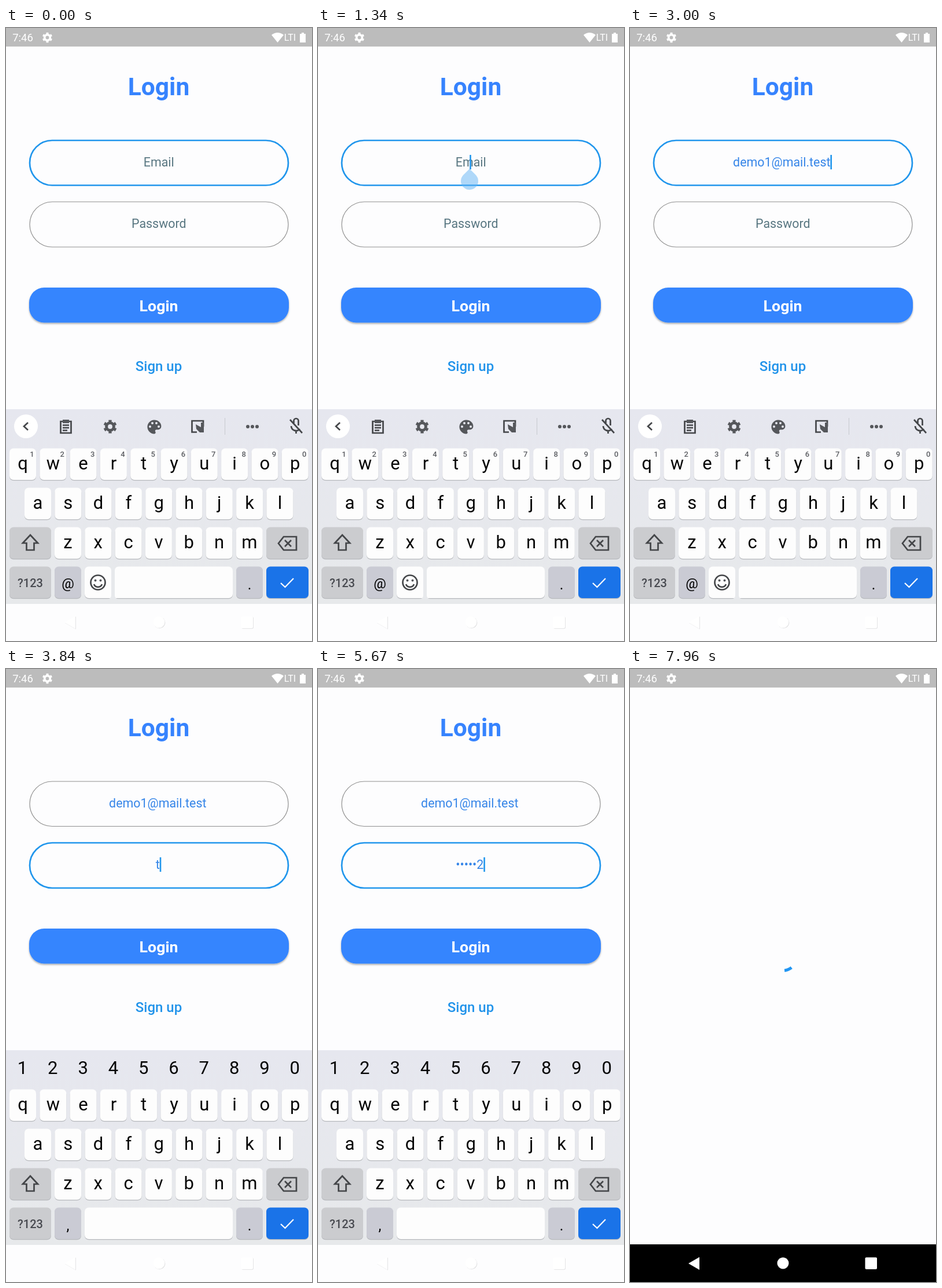
An HTML page for the animation above (8000 ms loop, 529 by 1058 pixels).

```html
<!DOCTYPE html>
<html lang="en">
<head>
<meta charset="utf-8">
<title>Login</title>
<style>
  html, body { margin: 0; width: 100%; height: 100%; overflow: hidden; background: #fdfdfe; }
  svg { display: block; width: 529px; height: 1058px; font-family: Roboto, sans-serif; }
  text { text-anchor: middle; }
  .line { fill: none; stroke: #444649; stroke-width: 2.7; }
  .field { fill: none; stroke: #8f8f8f; stroke-width: 1.2; }
  .field.on { stroke: #2196ec; stroke-width: 2.7; }
  .entry { font-size: 21.4px; fill: #3585e8; }
  .entry.hint { fill: #587681; }
  .letter { font-size: 31px; fill: #050505; }
  .small { font-size: 13px; font-weight: 500; fill: #5b5d62; }
</style>
</head>
<body>
<svg viewBox="0 0 529 1058">
  <defs>
    <g id="gear" fill="none" stroke="currentColor">
      <circle r="6.4" stroke-width="5"/>
      <circle r="9.6" stroke-width="4" pathLength="60" stroke-dasharray="5 5" stroke-dashoffset="-2.5"/>
    </g>
    <g id="nav">
      <path d="M101 1026L120 1015V1037Z"/>
      <circle cx="264.5" cy="1025.5" r="10"/>
      <rect x="406.500" y="1015.500" width="20.500" height="20.500" rx="2"/>
    </g>
    <filter id="shade" x="-5%" y="-20%" width="110%" height="150%">
      <feDropShadow dx="0" dy="2" stdDeviation="1.5" flood-opacity=".32"/>
    </filter>
    <linearGradient id="board" x2="0" y2="1">
      <stop stop-color="#e6e7ef"/><stop offset="1" stop-color="#e7e9eb"/>
    </linearGradient>
  </defs>

  <rect width="529" height="1058" fill="#fdfdfe"/>
  <g fill="#fff">
    <rect width="529" height="32" fill="#bcbcbc"/>
    <text x="29" y="23" font-size="18.5">7:46</text>
    <use href="#gear" color="#fff" transform="translate(71.500 16.500) scale(.75)"/>
    <path d="M459 12Q469.500 4 480 12L469.500 25Z"/>
    <text x="491" y="22" font-size="16">LTI</text>
    <path d="M511 8H515V10H518V25H508V10H511Z"/>
  </g>

  <g id="form">
    <text x="264" y="116" font-size="42.500" font-weight="700" fill="#3683fe">Login</text>
    <rect id="box0" class="field" x="41" y="194" width="447" height="77.500" rx="38.700"/>
    <rect id="box1" class="field" x="41" y="300" width="447" height="78" rx="39"/>
    <text id="entry0" class="entry" y="238.500"></text>
    <text id="entry1" class="entry" y="345"></text>
    <rect id="caret" width="2.600" height="25" fill="#2196ec"/>
    <path id="handle" d="M262 243L272.600 253.600A15 15 0 1 1 251.400 253.600Z" fill="#64b5f6"/>
    <rect x="40" y="448" width="449" height="60.500" rx="26" fill="#3585fe" filter="url(#shade)"/>
    <text x="264" y="489" font-size="26.700" font-weight="700" fill="#fff">Login</text>
    <text x="264" y="592" font-size="24" font-weight="500" fill="#2193ea">Sign up</text>
  </g>

  <circle id="spinner" r="23.500" pathLength="360" fill="none" stroke="#2196f3" stroke-width="5.200"/>

  <g id="keyboard">
    <rect y="658" width="529" height="336" fill="url(#board)"/>
    <rect y="994" width="529" height="64" fill="#fdfdfe"/>
    <g id="keys"></g>
    <g class="line">
      <path d="M42 875L55 889H48.500V901H35.500V889H29Z"/>
      <path d="M480 878H502V901H480L471 889.500ZM482 884L493 895M493 884L482 895"/>
      <path d="M475 958L482.500 965L497 950" stroke="#fff" stroke-width="2.300"/>
    </g>
    <text x="42" y="965" font-size="20" font-weight="500" fill="#484a50">?123</text>
    <text x="421" y="969" font-size="25">.</text>

    <g id="mailKeys">
      <circle cx="34.500" cy="687.500" r="20.500" fill="#fff"/>
      <g class="line">
        <path d="M38 681L31 687.500L38 694"/>
        <path d="M94.500 679H112.500V699H94.500ZM98 685.500H109M98 690H109M98 694.500H106"/>
        <path d="M341 688V678H321.500V697.500H330"/>
        <path d="M378.500 673V702" stroke="#c7c9ce" stroke-width="1"/>
        <path d="M497.500 682V678A4 4 0 0 1 505.500 678V686M493 687A8.500 8.500 0 0 0 508 692M501.500 695V700M491 676L512 699"/>
        <circle cx="159" cy="957" r="12.500"/>
        <path d="M152 960A7.500 7.500 0 0 0 166 960"/>
      </g>
      <g fill="#55575b">
        <path d="M98 676H109V682H98Z"/>
        <path d="M328 684L337 689V681H342V698H335L329 692Z"/>
        <use href="#gear" color="#55575b" transform="translate(180 688)"/>
        <path transform="translate(242 674) scale(1.200)" d="M12 2C6.500 2 2 6.500 2 12S6.500 22 12 22C13.500 22 14.500 20.500 13.500 19C12.700 17.500 13.500 16 15 16H17C20 16 22 14 22 11C22 6 17.500 2 12 2Z"/>
        <circle cx="418" cy="688" r="3"/><circle cx="426" cy="688" r="3"/><circle cx="434" cy="688" r="3"/>
        <circle cx="154.500" cy="953.500" r="2"/><circle cx="163.500" cy="953.500" r="2"/>
      </g>
      <g fill="#e6e7ef">
        <circle cx="249" cy="688" r="2"/><circle cx="253" cy="682" r="2"/>
        <circle cx="260" cy="682" r="2"/><circle cx="264" cy="688" r="2"/>
      </g>
      <text x="107" y="967" font-size="24">@</text>
    </g>
    <g id="passKeys"><text x="107" y="969" font-size="25">,</text></g>
  </g>

  <rect id="navBar" y="993" width="529" height="65" fill="#000"/>
  <use id="navShade" href="#nav" x=".8" y=".8" fill="#dedee0"/>
  <use href="#nav" fill="#fff"/>
</svg>

<script>
const $ = id => document.getElementById(id);
const set = (el, attrs) => { for (const k in attrs) el.setAttribute(k, attrs[k]); };
const show = (el, on) => { el.style.display = on ? '' : 'none'; };

function add(parent, tag, attrs, text = '') {
  const el = document.createElementNS('http://www.w3.org/2000/svg', tag);
  set(el, attrs);
  el.textContent = text;
  parent.append(el);
}

function key(parent, x, y, w, fill = '#fdfdfd') {
  const shape = { x, width: w, height: 54.5, rx: 7 };
  add(parent, 'rect', { ...shape, y: y + 1.2, fill: '#b7b9bd' });
  add(parent, 'rect', { ...shape, y, fill });
}

function buildKeys() {
  const keys = $('keys'), step = 52.3;
  [['qwertyuiop', 6], ['asdfghjkl', 32], ['zxcvbnm', 84]].forEach(([row, left], r) => {
    [...row].forEach((c, i) => {
      const x = left + i * step, y = 725.5 + r * 68;
      key(keys, x, y, 46);
      add(keys, 'text', { class: 'letter', x: x + 23, y: y + 36.5 }, c);
    });
  });
  [...'1234567890'].forEach((d, i) => {
    add($('mailKeys'), 'text', { class: 'small', x: 45 + i * step, y: 740 }, d);
    add($('passKeys'), 'text', { class: 'letter', x: 28.5 + i * step, y: 699 }, d);
  });
  key(keys, 6, 861.5, 72, '#cbcccf');
  key(keys, 450, 861.5, 73, '#cbcccf');
  key(keys, 6, 929.5, 72, '#cbcccf');
  key(keys, 84, 929.5, 46, '#cacbd4');
  key(keys, 136, 929.5, 256);
  key(keys, 398, 929.5, 46, '#cacbd4');
  key(keys, 450, 929.5, 73, '#1a73e8');
  // gap between the emoji key and the space bar
  const gap = document.querySelector('#mailKeys');
  const strip = document.createElementNS('http://www.w3.org/2000/svg', 'path');
  set(strip, { d: 'M179 929H195Q188 930 188 937V979Q188 985 195 986H175Q182 985 182 979V937Q182 930 175 929Z', fill: '#e7e9ec' });
  gap.prepend(strip);
}
buildKeys();

const LOOP = 8000;
const MAIL = { text: 'demo1@mail.test', start: 1650, gap: 82 };
const PASS = { text: 'test12', start: 3800, gap: 144 };
const FOCUS_PASS = 3400, LOADING = 6930, SLIDE = 6990, SLIDE_TIME = 250;

const clamp = v => Math.max(0, Math.min(1, v));
const typedCount = (f, t) => Math.max(0, Math.min(f.text.length, Math.floor((t - f.start) / f.gap) + 1));
const lastInput = (f, n) => f.start + (n - 1) * f.gap;

// cubic-bezier(.4, 0, .2, 1)
function fastOutSlowIn(x) {
  let lo = 0, hi = 1, s = .5;
  for (let i = 0; i < 20; i++) {
    s = (lo + hi) / 2;
    const u = 1 - s;
    if (1.2 * u * u * s + .6 * u * s * s + s ** 3 < x) lo = s; else hi = s;
  }
  return s * s * (3 - 2 * s);
}

function drawForm(t) {
  const n = typedCount(MAIL, t), m = typedCount(PASS, t), onPass = t >= FOCUS_PASS;
  const masked = '•'.repeat(Math.max(0, m - 1)) +
    (m ? (t < lastInput(PASS, m) + 1500 ? PASS.text[m - 1] : '•') : '');
  const entries = [n ? MAIL.text.slice(0, n) : 'Email', masked || 'Password'];
  const counts = [n, m];
  entries.forEach((s, i) => {
    const el = $('entry' + i);
    if (el.textContent !== s) el.textContent = s;
    set(el, { class: counts[i] ? 'entry' : 'entry hint', x: counts[i] ? 262.3 : 264.3 });
    set($('box' + i), { class: i === +onPass ? 'field on' : 'field' });
  });

  const active = +onPass, count = counts[active];
  const since = count ? lastInput(active ? PASS : MAIL, count)
    : active ? FOCUS_PASS : t < 1265 ? -700 : 1265;
  show($('caret'), (t - since) % 1000 < 500);
  const half = count ? $('entry' + active).getComputedTextLength() / 2 : 0;
  set($('caret'), { x: 262.2 + half, y: active ? 325 : 219 });
  set($('handle'), { opacity: clamp((t - 1265) / 150) * clamp((1800 - t) / 150) });
}

function drawSpinner(t) {
  const turns = (t - LOADING) / 1285, p = turns % 1;
  const head = 270 * fastOutSlowIn(clamp(p * 2));
  const tail = 270 * fastOutSlowIn(clamp(p * 2 - 1));
  const sweep = Math.max(.1, head - tail);
  const y = t < 7200 ? 329.5 : 497;
  set($('spinner'), {
    transform: `translate(264.5 ${y}) rotate(${tail - 103 + 345 * p})`,
    'stroke-dasharray': `${sweep} ${360 - sweep}`
  });
}

function draw(now) {
  const t = now % LOOP, loading = t >= LOADING, closed = t >= SLIDE + SLIDE_TIME;
  show($('form'), !loading);
  show($('spinner'), loading);
  if (loading) drawSpinner(t); else drawForm(t);
  show($('mailKeys'), t < FOCUS_PASS + 100);
  show($('passKeys'), t >= FOCUS_PASS + 100);
  show($('keyboard'), !closed);
  show($('navBar'), closed);
  show($('navShade'), !closed);
  set($('keyboard'), { transform: `translate(0 ${400 * clamp((t - SLIDE) / SLIDE_TIME) ** 1.45})` });
}

const begin = performance.now();
function tick() {
  draw(performance.now() - begin);
  requestAnimationFrame(tick);
}
tick();
</script>
</body>
</html>
```
